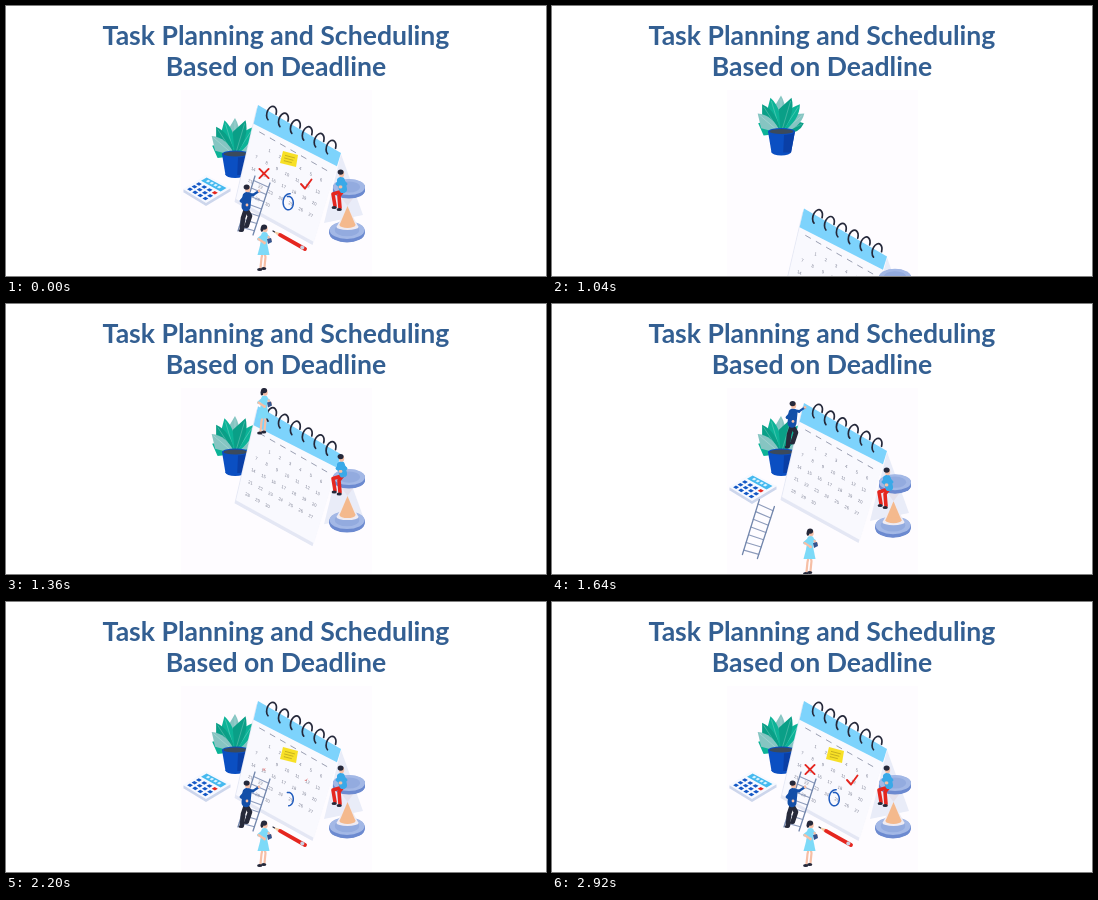
These frames come from a looping animation (540 px wide and 270 px high, 3.56 s). An HTML page with a canvas:

```html
<!DOCTYPE html>
<html lang="en">
<head>
<meta charset="utf-8">
<title>Task Planning</title>
<style>
html, body { margin: 0; width: 100%; height: 100%; overflow: hidden; background: #fff; }
canvas { position: absolute; left: 0; top: 0; width: 540px; height: 270px; }
h1 {
  position: absolute; left: 0; top: 14px; width: 540px; margin: 0;
  font: bold 26.6px/31px Lato, sans-serif; color: #335f92; text-align: center; white-space: nowrap;
}
</style>
</head>
<body>
<canvas id="stage"></canvas>
<h1>Task Planning and Scheduling<br>Based on Deadline</h1>
<script>
const LOOP = 3560, STEP = 40;
const canvas = document.getElementById('stage');
const ctx = canvas.getContext('2d');
const dpr = window.devicePixelRatio || 1;
canvas.width = 540 * dpr;
canvas.height = 270 * dpr;

const SKIN = '#f6bfa6', INK = '#25283a', RED = '#e5261f';

const ramp = (t, from, span) => Math.min(1, Math.max(0, (t - from) / span));
// Ease out; a bounce above 1 makes it overshoot and settle.
const ease = (p, bounce = 0) => 1 - (1 - p) ** 2 * (1 - bounce * p);
const mix = (a, b, p) => [a[0] + (b[0] - a[0]) * p, a[1] + (b[1] - a[1]) * p];
const add = (a, b) => [a[0] + b[0], a[1] + b[1]];

function trace(pts) {
  ctx.beginPath();
  for (const p of pts) ctx.lineTo(...p);
}
function poly(fill, ...pts) {
  trace(pts);
  ctx.fillStyle = fill;
  ctx.fill();
}
function line(color, width, ...pts) {
  trace(pts);
  ctx.strokeStyle = color;
  ctx.lineWidth = width;
  ctx.stroke();
}
function oval(fill, [x, y], rx, ry) {
  ctx.beginPath();
  ctx.ellipse(x, y, rx, ry, 0, 0, 7);
  ctx.fillStyle = fill;
  ctx.fill();
}
function placed([x, y], scale, paint) {
  ctx.save();
  ctx.translate(x, y);
  ctx.scale(scale, scale);
  paint();
  ctx.restore();
}

// A tilted sheet: maps u, v in 0..1 to the stage.
const sheet = (tl, tr, br, bl) => (u, v) => mix(mix(tl, tr, u), mix(bl, br, u), v);
function tile(fill, at, u, v, w, h) {
  poly(fill, at(u, v), at(u + w, v), at(u + w, v + h), at(u, v + h));
}
const page = sheet([252, 99], [335, 147], [308, 236], [230, 193]);
const device = sheet([200, 169], [225, 182], [200, 197], [177, 183]);

function leaf(color, angle, length) {
  placed([229, 150], 1, () => {
    ctx.rotate(angle);
    ctx.beginPath();
    ctx.quadraticCurveTo(-9, -length * .6, 0, -length);
    ctx.quadraticCurveTo(9, -length * .6, 0, 0);
    ctx.fillStyle = color;
    ctx.fill();
    line('#ffffff55', .6, [0, 0], [0, -length * .9]);
  });
}

function plant() {
  const greens = ['#0cb397', '#86c5c2', '#0a9f87'], count = 9;
  for (let i = 0; i < count; i++) {
    const k = (i * 4 % count) / (count - 1) * 2 - 1;
    leaf(greens[i % 3], k * 1.15, 38 - 13 * k * k);
  }
  const pot = sheet([216, 148], [243, 148], [239, 169], [219.5, 169]);
  oval('#0b4fc2', [229.2, 168.5], 9.8, 3.5);
  tile('#0b4fc2', pot, 0, 0, 1, 1);
  tile('#0a3fa6', pot, .6, 0, .4, 1);
  oval('#0b4fc2', [229.5, 148], 13.5, 3.5);
  oval('#3b4a5c', [229.5, 148], 12, 2.5);
}

function ring(at) {
  placed(at, 1, () => {
    ctx.rotate(.3);
    ctx.beginPath();
    ctx.ellipse(0, 0, 4.6, 7.4, 0, 1.9, 6.2);
    ctx.strokeStyle = INK;
    ctx.lineWidth = 1.7;
    ctx.stroke();
  });
}

function calendar() {
  poly('#e9ecf8', [335, 148], [357, 209], [318, 217]);
  placed([-1.5, 3], 1, () => tile('#e4e7f4', page, 0, 0, 1, 1));
  tile('#f9f9fe', page, 0, 0, 1, 1);
  poly('#7dd3fc', page(0, 0), page(1, 0), page(1, .15), page(0, .2));

  ctx.textAlign = 'center';
  ctx.textBaseline = 'middle';
  ctx.font = '4.4px Arial, "Liberation Sans", sans-serif';
  ctx.fillStyle = '#7b7f92';
  const left = col => .115 + col * .127;
  for (let col = 0; col < 7; col++)
    line('#9a9fb2', 1, page(left(col) - .03, .245), page(left(col) + .03, .245));
  for (let day = 1; day <= 30; day++) {
    const [x, y] = page(left(day % 7), .37 + Math.floor(day / 7) * .13);
    ctx.save();
    ctx.transform(.88, .46, -.2, .98, x, y);
    ctx.fillText(day, 0, 0);
    ctx.restore();
  }
  for (let i = 0; i < 6; i++) ring([265.5 + i * 11.9, 107.5 + i * 6.8]);
}

function disc(x, y, rx, ry) {
  for (let h = 3.5; h > 0; h -= .5) oval('#6c8ad0', [x, y + h], rx, ry);
  oval('#a3b8e6', [x, y], rx, ry);
  oval('#93abdf', [x, y], rx * .7, ry * .7);
}

function cone(fill, [x, y], width, height) {
  poly(fill, [x, y], [x - width, y + height], [x + width, y + height]);
  if (height > 0) oval(fill, [x, y + height], width, 3);
}

function hourglass() {
  const neck = [341.5, 200];
  disc(341, 224, 17.5, 9);
  cone('#eeebf3', neck, 11, 21);
  cone('#e4e1ec', neck, 11, -15);
  cone('#f4b98d', neck, 8, 19);
  disc(343, 181, 16, 8);
}

// Limbs are points relative to the hip (legs) or the neck (arms).
function figure(hip, { neck, shirt, width, pants, thick, legs, arms, skirt }) {
  const top = add(hip, neck);
  for (const leg of legs) {
    const pts = leg.map(p => add(hip, p));
    line(pants, thick, hip, ...pts);
    oval(INK, add(pts[pts.length - 1], [-.8, 1.5]), 2.6, 1.5);
  }
  line(shirt, width, add(top, [0, width / 2]), add(hip, [0, -width / 4]));
  if (skirt) poly(shirt, add(hip, [-2, -9]), add(hip, [3, -9]), add(hip, [6, 6]), add(hip, [-6, 6]));
  for (const arm of arms) {
    const pts = arm.map(p => add(top, p));
    line(shirt, 2.8, add(top, [0, 2]), pts[0]);
    line(skirt ? SKIN : shirt, 2.2, ...pts);
    oval(SKIN, pts[pts.length - 1], 1.4, 1.4);
  }
  const head = add(top, [0, -3.5]);
  oval(SKIN, add(head, [.6, .5]), 2.6, 3.3);
  oval(INK, add(head, [-.4, -1.4]), 3, 2.6);
  if (skirt) oval(INK, add(head, [-2.6, .8]), 1.4, 2.8);
}

const sitter = () => figure([337, 185], {
  neck: [-2, -14], shirt: '#3aa9e8', width: 8, pants: RED, thick: 3.6,
  legs: [[[-4, 5], [-3, 17]], [[-10, 3], [-8, 15]]],
  arms: [[[5, 7], [0, 10]], [[-4, 7], [-1, 10]]]
});

const climber = () => figure([240, 203], {
  neck: [1, -17], shirt: '#134fa8', width: 9, pants: '#272a3a', thick: 4.6,
  legs: [[[-3, 9], [-4, 20]], [[4, 7], [1, 16]]],
  arms: [[[6, 3], [12, -1]], [[-6, 9], [0, 13]]]
});

function woman() {
  figure([257.5, 243], {
    neck: [1, -17], shirt: '#7ddaf8', width: 6.5, pants: SKIN, thick: 2.2, skirt: true,
    legs: [[[-2, 9], [-3, 19]], [[2, 8], [1, 18]]],
    arms: [[[-6, 7], [0, 11]], [[4, 5], [6, 8]]]
  });
  poly('#34558f', [261, 233], [265, 232], [266, 236], [262, 238]);
}

function calculator() {
  for (let h = 3; h >= 0; h--)
    placed([0, h], 1, () => tile(h ? '#cdd6ec' : '#f7f9ff', device, 0, 0, 1, 1));
  tile('#45b9ef', device, .1, .08, .8, .24);
  for (let c = 0; c < 4; c++) {
    tile('#d8f3ff', device, .22 + c * .15, .14, .09, .1);
    for (let r = 0; r < 3; r++)
      tile(c + r === 3 && r === 0 ? RED : '#1559c6', device, .1 + c * .22, .42 + r * .19, .13, .12);
  }
}

function ladder() {
  const at = sheet([249, 170], [264, 177], [247, 229], [232, 225]);
  for (let v = .08; v < 1; v += .14) line('#8d9bbb', 1.1, at(0, v), at(1, v));
  for (const u of [0, 1]) line('#7286ac', 1.3, at(u, 0), at(u, 1));
}

function pencil() {
  const at = p => mix([267, 225], [299, 243], p);
  poly('#f2cda6', at(0), add(at(.2), [1, -1.7]), add(at(.2), [-1, 1.7]));
  line(INK, 1.2, at(0), at(.05));
  line(RED, 3.8, at(.22), at(1));
  line('#c9d0e0', 3.8, at(.91), at(.92));
}

function note() {
  const at = sheet([-6, -8], [9, -4], [7, 8], [-9, 4]);
  tile('#f7e026', at, 0, 0, 1, 1);
  for (let v = .3; v < .9; v += .22) line('#b39c1e', .7, at(.2, v), at(.9 - v * .3, v));
}

function cross() {
  for (const k of [-1, 1]) line(RED, 1.9, [-4.6, 4.6 * k], [4.6, -4.6 * k]);
}

function check() {
  line(RED, 1.9, [-5, 0], [-1, 4.500], [5.500, -4.500]);
}

// A circle drawn by hand: the radius grows toward the end.
function loop(p) {
  const pts = [];
  for (let k = 0; k <= p; k += .02) {
    const a = 6.9 * k - 1.8, r = .85 + .4 * k ** 4;
    pts.push([282.5 + 5.6 * r * Math.cos(a), 197 + 7.8 * r * Math.sin(a)]);
  }
  line('#1f5bbd', 1.5, ...pts);
}

function marks(t) {
  const grow = (at, from, span, paint) => {
    const p = ramp(t, from, span);
    if (p > 0) placed(at, p, paint);
  };
  grow([283, 153], 1980, 140, note);
  if (t > 2040) loop(ramp(t, 2040, 320));
  grow([258, 167.5], 2120, 360, cross);
  grow([300, 178], 2120, 360, check);
}

// Parts from back to front: start, duration, shift at the start, bounce.
const parts = [
  [plant, 880, 320, [0, -90]],
  [calendar, 930, 500, [0, 170]],
  [marks],
  [hourglass, 1024, 720, [0, 100], 2.74],
  [sitter, 1160, 300, [0, -122]],
  [calculator, 1380, 220, [-52, 0]],
  [ladder, 1540, 320, [-88, 54]],
  [climber, 1570, 280, [0, -145]],
  [pencil, 1680, 280, [100, 55]],
  [woman, 1330, 420, [0, -182], 2]
];

function draw(t) {
  ctx.setTransform(dpr, 0, 0, dpr, 0, 0);
  ctx.fillStyle = '#fff';
  ctx.fillRect(0, 0, 540, 270);
  ctx.save();
  ctx.beginPath();
  ctx.rect(175, 84, 191, 186);
  ctx.clip();
  ctx.fillStyle = '#fefcff';
  ctx.fillRect(175, 84, 191, 186);
  for (const [paint, start = 0, span = 1, from = [0, 0], bounce] of parts) {
    if (t < start) continue;
    placed(mix(from, [0, 0], ease(ramp(t, start, span), bounce)), 1, () => paint(t));
  }
  ctx.restore();
}

const begin = performance.now();
function tick(now) {
  const t = Math.floor(Math.max(0, now - begin) % LOOP / STEP) * STEP;
  draw(t < 440 ? LOOP : t); // the loop opens on the finished picture
  requestAnimationFrame(tick);
}
ctx.lineCap = 'round';
ctx.lineJoin = 'round';
tick(begin);
</script>
</body>
</html>
```
